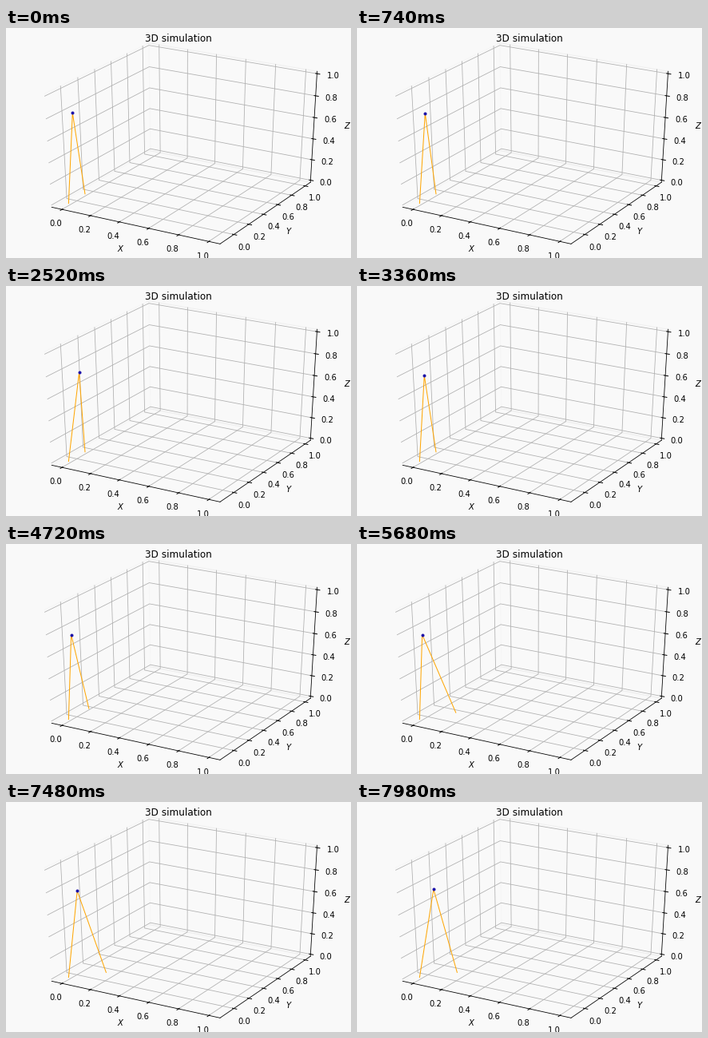
Write a matplotlib script that moves like this. It is 432 px wide and 288 px high and loops after 8 s.

```python
import numpy as np
import matplotlib.pyplot as plt
from matplotlib.animation import FuncAnimation
from matplotlib.collections import LineCollection

W, H = 432, 288
FRAMES, STEP = 400, 20
LOW = np.array([-0.05, -0.155, 0.0])
HIGH = np.array([1.05, 1.055, 1.0])
EDGE = 0.5 + 1 / 48          # half size of the slightly padded cube
BACK = "#f9f9f9"

plt.rcParams["font.family"] = "DejaVu Sans"
plt.rcParams["font.size"] = 10

fig = plt.figure(figsize=(W / 72, H / 72), dpi=72, facecolor=BACK)
ax = fig.add_axes([0, 0, 1, 1])
ax.set_xlim(0, W)
ax.set_ylim(0, H)
ax.axis("off")

AZIM, ELEV, DIST = np.radians(-60), np.radians(30), 10
ca, sa, ce, se = np.cos(AZIM), np.sin(AZIM), np.cos(ELEV), np.sin(ELEV)
VIEW = np.array([[-sa, ca, 0],
                 [-ca * se, -sa * se, ce],
                 [ca * ce, sa * ce, se]])


def project(p):
    """Unit cube coordinates (centred on 0) to stage pixels."""
    u, v, near = VIEW @ np.asarray(p, float)
    k = DIST / (DIST - near)
    return W * (u * k + 0.95) / 1.85, H * (v * k + 0.95) / 1.85


def unit(p):
    return (np.asarray(p, float) - LOW) / (HIGH - LOW) - 0.5


def world(p):
    return project(unit(p))


def add_lines(paths, color, width, z):
    pts = [[project(p) for p in path] for path in paths]
    ax.add_collection(LineCollection(pts, colors=color, linewidths=width,
                                     zorder=z, capstyle="projecting"))


def replaced(p, **parts):
    q = list(p)
    for name, value in parts.items():
        q["xyz".index(name)] = value
    return q


def draw_box():
    e = EDGE
    c = [(-e, -e, -e), (e, -e, -e), (e, e, -e), (-e, e, -e),
         (-e, -e, e), (e, -e, e), (e, e, e), (-e, e, e)]
    panes = [((0, 3, 7, 4), 0.95), ((3, 2, 6, 7), 0.90), ((0, 1, 2, 3), 0.925)]
    for order, shade in panes:
        add_lines([[c[i] for i in order]], (shade, shade, shade, 0.5), 1, 1)

    # per axis: edge it lies on, grid corner, grid ends, tick direction
    corner = (-e, e, -e)
    axes = [
        ("x", (0, -e, -e), (dict(y=-e), dict(z=e)), (0, -1, 0)),
        ("y", (e, 0, -e), (dict(x=e), dict(z=e)), (1, 0, 0)),
        ("z", (e, e, 0), (dict(y=-e), dict(x=e)), (1, 0, 0)),
    ]
    for i, (name, edge, ends, out) in enumerate(axes):
        away = np.sign(edge)
        add_lines([[replaced(edge, **{name: -e}), replaced(edge, **{name: e})]],
                  "black", 0.8, 3)
        grid, ticks = [], []
        for value in np.arange(6) / 5:
            at = (value - LOW[i]) / (HIGH[i] - LOW[i]) - 0.5
            base = replaced(corner, **{name: at})
            grid.append([replaced(base, **ends[0]), base,
                         replaced(base, **ends[1])])
            spot = np.array(replaced(edge, **{name: at}))
            d = np.array(out) / 12
            ticks.append([spot + 0.2 * d, spot - 0.1 * d])
            x, y = project(spot + away * 11.5 / 15 / 12)
            ax.text(x, y, f"{value:.1f}", ha="center", va="top")
        add_lines(grid, "#b0b0b0", 0.8, 2)
        add_lines(ticks, "black", 1, 3)
        x, y = project(np.array(edge) + away * 25 / 15 / 12)
        ax.text(x, y, f"${name.upper()}$", ha="center", va="center")


draw_box()
ax.text(W / 2, 0.92 * H + 6, "3D simulation", fontsize=12,
        ha="center", va="baseline")

legs, = ax.plot([], [], color="orange", lw=1, zorder=5)
hip_dot, = ax.plot([], [], "o", color="#1a0fa8", ms=3, zorder=6)


def ease(t, start, length):
    """Minimum jerk progress from 0 to 1."""
    s = np.clip((t - start) / length, 0, 1)
    return s ** 3 * (10 - 15 * s + 6 * s * s)


def pose(t):
    shift = ease(t, 6060, 4000)
    hip = (0.05 * ease(t, 60, 2000) + 0.05 * shift,
           -0.1 * ease(t, 2070, 2000) + 0.2 * shift,
           0.8)
    swing = np.clip((t - 4080) / 2000, 0, 1)
    left = (0, -0.1, 0)
    right = (0.15 * ease(t, 4080, 2000), 0.1, 0.025 * np.sin(np.pi * swing))
    return left, hip, right


def update(i):
    left, hip, right = (world(p) for p in pose(i * STEP))
    legs.set_data(*zip(left, hip, right))
    hip_dot.set_data([hip[0]], [hip[1]])
    return legs, hip_dot


anim = FuncAnimation(fig, update, frames=FRAMES, interval=STEP,
                     init_func=lambda: update(0), repeat=True, repeat_delay=0)
plt.show()
```
